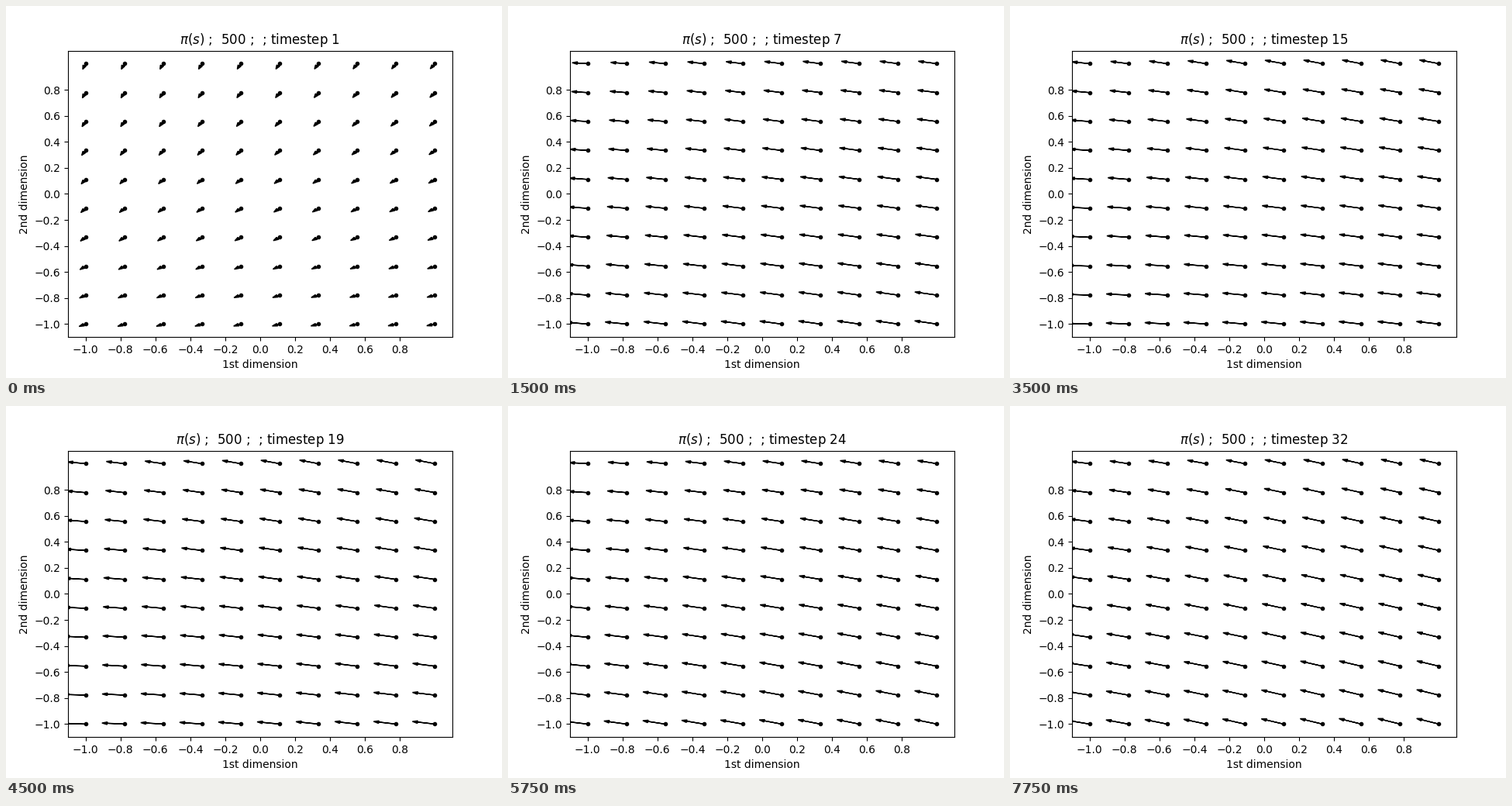
Write a matplotlib script that moves like this. It is 640x480 px and loops after 8000 ms.

```python
import numpy as np
import matplotlib.pyplot as plt
from matplotlib.animation import FuncAnimation

STEPS = 32
INTERVAL = 250
MAX_ACTION = 0.1


def settle(step, tau):
    """Exponential approach from 0 at the first step towards 1."""
    return 1 - np.exp(-(step - 1) / tau)


def smooth(step, start, end):
    u = np.clip((step - start) / (end - start), 0, 1)
    return u * u * (3 - 2 * u)


def policy(x, y, step):
    """Saturated action at state (x, y)."""
    grow = settle(step, 4.5)

    # Horizontal pull: grows quickly, strongest in the lower rows.
    strength = 0.1 + 1.55 * grow
    lean = 0.3 * np.exp(-(step - 1) / 20)
    pull = strength * np.exp(lean * x - (0.3 + 0.15 * grow) * y)

    # Vertical lift: turns from down to up, then climbs slowly.
    base = -0.1 + 0.255 * settle(step, 2) + 0.0085 * max(step - 19, 0)
    tilt = -0.05 + 0.08 * smooth(step, 4, 13) * (1 - smooth(step, 19, 24))
    lift = base + tilt * y + grow * (0.06 * x - 0.03 * x**2)

    return -MAX_ACTION * np.tanh(pull), MAX_ACTION * np.tanh(lift)


fig, ax = plt.subplots(figsize=(6.4, 4.8), dpi=100)
ax.set_xlim(-1.1, 1.1)
ax.set_ylim(-1.1, 1.1)
ticks = np.arange(-10, 10, 2) / 10
ax.set_xticks(ticks)
ax.set_yticks(ticks)
ax.set_xlabel("1st dimension")
ax.set_ylabel("2nd dimension")
title = ax.set_title("")

grid = np.linspace(-1, 1, 10)
xs, ys = (a.ravel() for a in np.meshgrid(grid, grid))
ax.plot(xs, ys, "k.")
arrows = [ax.arrow(x, y, -MAX_ACTION, 0, head_width=0.02, color="k")
          for x, y in zip(xs, ys)]


def update(i):
    step = i + 1
    for arrow, dx, dy in zip(arrows, *policy(xs, ys, step)):
        arrow.set_data(dx=dx, dy=dy)
    title.set_text(rf"$\pi(s)$ ;  500 ;  ; timestep {step}")
    return [title, *arrows]


anim = FuncAnimation(fig, update, frames=STEPS, interval=INTERVAL, repeat=True,
                     repeat_delay=0, blit=False)
plt.show()
```
